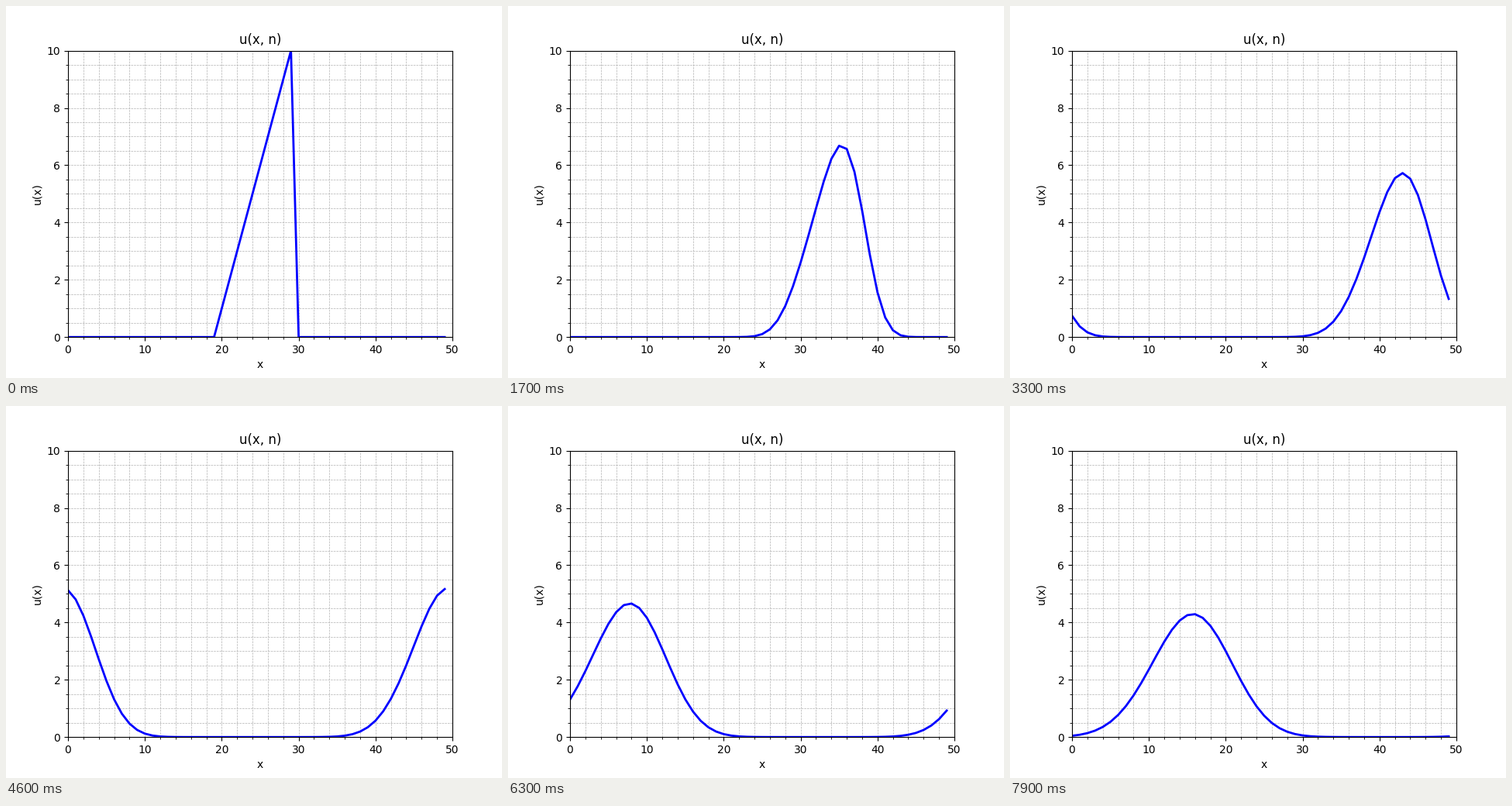
Write a matplotlib script that moves like this. It is 640 px wide and 480 px high and loops after 8 s.

```python
import numpy as np
import matplotlib.pyplot as plt
from matplotlib.animation import FuncAnimation

POINTS = 50
STEPS = 80
COURANT = 0.5  # c * dt / dx


def initial_wave():
    """Sawtooth: ramp from 0 at x=19 to 10 at x=29, zero elsewhere."""
    x = np.arange(POINTS)
    return np.where((x >= 19) & (x < 30), x - 19.0, 0.0)


def solve():
    """First-order upwind advection with periodic boundaries."""
    u = np.empty((STEPS, POINTS))
    u[0] = initial_wave()
    for n in range(1, STEPS):
        u[n] = u[n - 1] - COURANT * (u[n - 1] - np.roll(u[n - 1], 1))
    return u


wave = solve()

fig, ax = plt.subplots(figsize=(6.4, 4.8), dpi=100)
ax.set(xlim=(0, 50), ylim=(0, 10), xlabel="x", ylabel="u(x)", title="u(x, n)")
ax.minorticks_on()
ax.grid(True, which="both", linestyle="--", linewidth=0.5)
line, = ax.plot(np.arange(POINTS), wave[0], color="b", lw=2)


def update(n):
    line.set_ydata(wave[n])
    return line,


anim = FuncAnimation(fig, update, frames=STEPS, interval=100,
                     repeat=True, repeat_delay=0)
plt.show()
```
